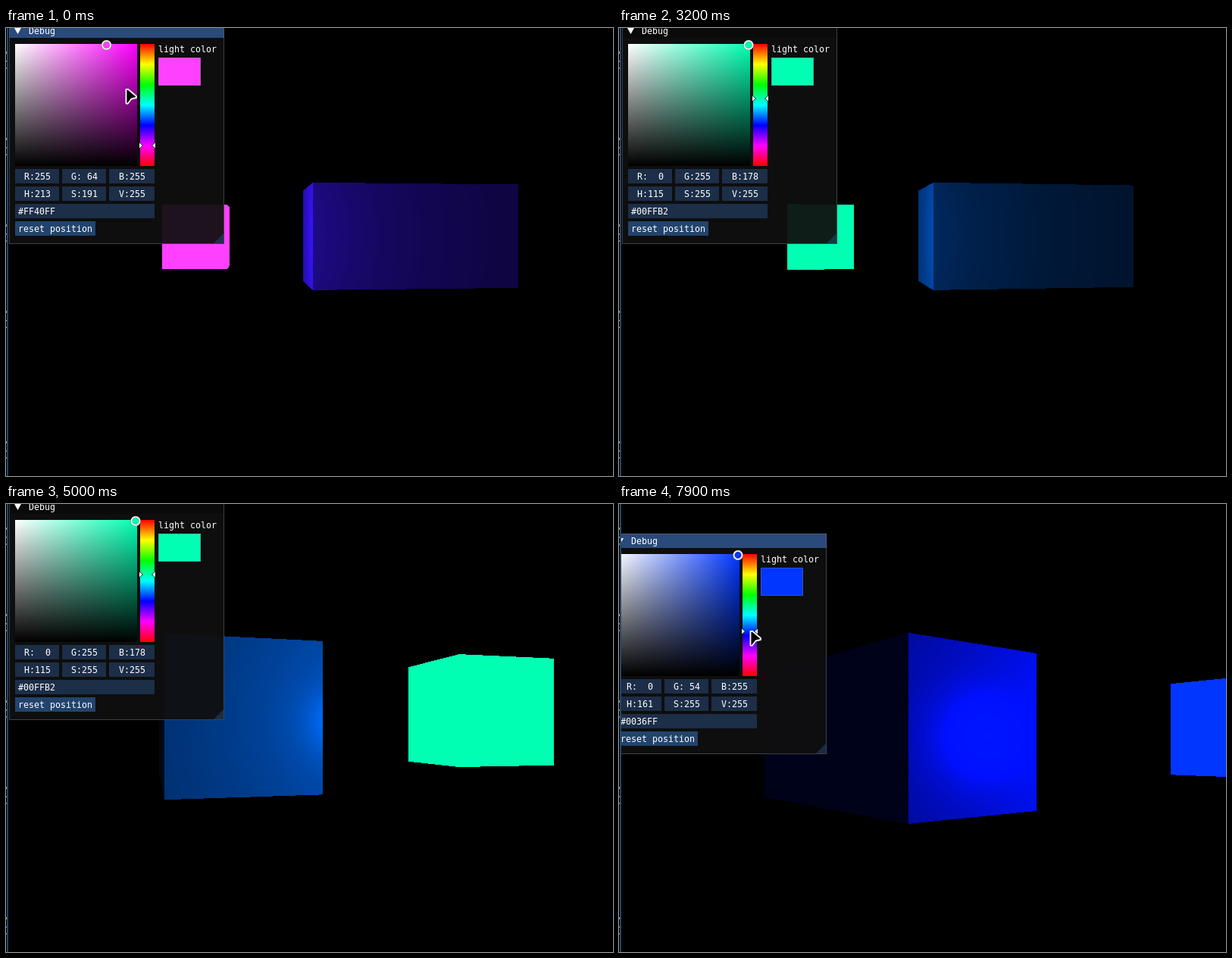
These frames come from a looping animation (801 by 591 pixels, 8000 ms). An HTML page with a canvas:

```html
<!DOCTYPE html>
<html lang="en">
<head>
<meta charset="utf-8">
<title>Light color demo</title>
<style>
html, body { margin: 0; width: 100%; height: 100%; overflow: hidden; background: #000; }
canvas { display: block; }
</style>
</head>
<body>
<canvas id="stage" width="801" height="591"></canvas>
<script>
const W = 801, H = 591, LOOP = 8000, STEP = 100;
const ctx = document.getElementById('stage').getContext('2d');

// Scene in world units: y is up, a lit box two units long and a small glowing cube.
const FOCAL = 720, CENTER_X = 400;
const BOX = { min: [0, -0.5, -1], max: [2, 0.5, 0], color: [0.22, 0.3, 1] };
const LAMP = { min: [-1.255, -0.25, 0.233], max: [-0.755, 0.25, 0.733] };
const LAMP_POS = [-1, 0, 0.48];

// Camera poses: time, x, y, z, yaw, screen height of the horizon.
const FLIGHT = [
  [2800, -0.566, 0.027, 5.038, 0.105, 271],
  [3200, -0.862, 0.027, 4.997, 0.15, 271],
  [3900, -1.9, -0.03, 1.7, 0.7, 273],
  [4400, -3.994, -0.083, -0.072, 1.414, 275.6],
  [5500, -2.887, -0.114, -1.92, 2.22, 324.6],
  [5700, -2.319, -0.114, -2.668, 2.22, 324.6]];

const progress = (t, a, b) => Math.max(0, Math.min(1, (t - a) / (b - a)));
const lerp = (a, b, f) => a + (b - a) * f;
const dot = (a, b) => a[0] * b[0] + a[1] * b[1] + a[2] * b[2];
const unit = v => {
  const n = Math.hypot(v[0], v[1], v[2]);
  return [v[0] / n, v[1] / n, v[2] / n];
};

const hueAt = t => 300 - 165 * progress(t, 900, 1400)
  + 26.88 * progress(t, 1600, 2000) + 65.41 * progress(t, 7400, 7900);
const satAt = t => 0.749 + 0.251 * progress(t, 300, 700);

function panelAt(t) {
  const f = progress(t, 7000, 7300);
  return [Math.round(4 - 14 * f ** 2.4), Math.round(-6 + 45 * f ** 1.47)];
}

function cursorAt(t) {
  const [px, py] = panelAt(t);
  const hueY = py + 26 + 161 * hueAt(t) / 360;
  if (t < 900) {
    const f = progress(t, 0, 900);
    return [158 + 26 * f, lerp(80, 154, f) - 110 * Math.sin(Math.PI * f)];
  }
  if (t < 2600) {
    const f = progress(t, 2000, 2400);
    return [lerp(181, 424, f), lerp(hueY, 300, f)];
  }
  if (t < 5900) return null;
  if (t < 7000) {
    const f = progress(t, 5900, 6700);
    return [lerp(505, 203, f) - 7 * progress(t, 6700, 6900), lerp(347, 113, f)];
  }
  if (t < 7400) return [px + 192, py + 128];
  return [lerp(182, 173, progress(t, 7300, 7900)), hueY];
}

function cameraAt(t) {
  const last = FLIGHT.length - 1;
  let i = 0;
  while (i < last - 1 && t >= FLIGHT[i + 1][0]) i++;
  const a = FLIGHT[i], b = FLIGHT[i + 1], f = progress(t, a[0], b[0]);
  const [x, y, z, yaw, horizon] = a.slice(1).map((v, k) => lerp(v, b[k + 1], f));
  return { eye: [x, y, z], sin: Math.sin(yaw), cos: Math.cos(yaw), horizon };
}

function hsv(h, s, v) {
  const part = n => {
    const k = (n + h / 60) % 6;
    return v - v * s * Math.max(0, Math.min(k, 4 - k, 1));
  };
  return [part(5), part(3), part(1)];
}

const css = c => `rgb(${c.map(v => Math.round(255 * v)).join(',')})`;

// Phong shading: ambient, diffuse and specular.
function brightness(p, axis, side, eye) {
  const toLamp = unit([LAMP_POS[0] - p[0], LAMP_POS[1] - p[1], LAMP_POS[2] - p[2]]);
  const diffuse = side * toLamp[axis];
  const bounce = toLamp.map((v, i) => i === axis ? v : -v);
  const toEye = unit([eye[0] - p[0], eye[1] - p[1], eye[2] - p[2]]);
  const shine = Math.max(0, dot(bounce, toEye)) ** 32;
  return 0.1 + Math.max(0, diffuse) + 0.5 * shine;
}

function screenBounds(solid, cam) {
  const us = [], vs = [];
  for (let i = 0; i < 8; i++) {
    const [dx, dy, dz] = [0, 1, 2].map(k => (i >> k & 1 ? solid.max : solid.min)[k] - cam.eye[k]);
    const depth = Math.max(0.1, dx * cam.sin - dz * cam.cos);
    us.push(CENTER_X + FOCAL * (dx * cam.cos + dz * cam.sin) / depth);
    vs.push(cam.horizon - FOCAL * dy / depth);
  }
  const clip = (v, max) => Math.max(0, Math.min(max, Math.round(v)));
  return [clip(Math.min(...us), W), clip(Math.max(...us), W),
    clip(Math.min(...vs), H), clip(Math.max(...vs), H)];
}

// Casts one ray per pixel against an axis-aligned solid.
function castSolid(image, solid, cam, light) {
  const [u0, u1, v0, v1] = screenBounds(solid, cam);
  const { eye, sin, cos } = cam;
  for (let v = v0; v < v1; v++) {
    for (let u = u0; u < u1; u++) {
      const sx = (u + 0.5 - CENTER_X) / FOCAL;
      const ray = [cos * sx + sin, (cam.horizon - v - 0.5) / FOCAL, sin * sx - cos];
      let near = 0, far = Infinity, axis = 0;
      for (let k = 0; k < 3; k++) {
        const a = (solid.min[k] - eye[k]) / ray[k], b = (solid.max[k] - eye[k]) / ray[k];
        const enter = Math.min(a, b);
        if (enter > near) { near = enter; axis = k; }
        far = Math.min(far, Math.max(a, b));
      }
      if (near >= far) continue;
      const hit = [eye[0] + ray[0] * near, eye[1] + ray[1] * near, eye[2] + ray[2] * near];
      const k = solid.color ? brightness(hit, axis, -Math.sign(ray[axis]), eye) : 1;
      const at = (v * W + u) * 4;
      for (let c = 0; c < 3; c++) {
        image.data[at + c] = 255 * light[c] * k * (solid.color ? solid.color[c] : 1);
      }
      image.data[at + 3] = 255;
    }
  }
}

function drawScene(t, light) {
  const cam = cameraAt(t), image = ctx.createImageData(W, H);
  castSolid(image, BOX, cam, light);
  castSolid(image, LAMP, cam, light);
  ctx.putImageData(image, 0, 0);
  ctx.globalCompositeOperation = 'destination-over';
  rect(0, 0, W, H, '#000');
  ctx.globalCompositeOperation = 'source-over';
}

function rect(x, y, w, h, fill) {
  ctx.fillStyle = fill;
  ctx.fillRect(x, y, w, h);
}

function poly(pts, fill) {
  ctx.beginPath();
  for (let i = 0; i < pts.length; i += 2) ctx.lineTo(pts[i], pts[i + 1]);
  ctx.closePath();
  ctx.fillStyle = fill;
  ctx.fill();
}

function ramp(x0, y0, x1, y1, colors) {
  const g = ctx.createLinearGradient(x0, y0, x1, y1);
  colors.forEach((c, i) => g.addColorStop(i / (colors.length - 1), c));
  return g;
}

function label(s, x, midY) {
  ctx.fillStyle = '#fff';
  ctx.fillText(s, x, midY + 4);
}

function field(s, x, y, w, center) {
  rect(x, y, w, 19, 'rgba(41,74,122,0.54)');
  label(s, center ? Math.round(x + (w - s.length * 7) / 2) : x + 4, y + 10);
}

function outline(x, y, w, h) {
  ctx.lineWidth = 1;
  ctx.strokeStyle = 'rgba(110,110,128,0.5)';
  ctx.strokeRect(x + 0.5, y + 0.5, w - 1, h - 1);
}

function hueArrow(x, y, dir) {
  poly([x - dir, y - 5, x + 5 * dir, y, x - dir, y + 5], '#000');
  poly([x, y - 3.5, x + 4 * dir, y, x, y + 3.5], '#fff');
}

function drawPicker(h, s, light) {
  const size = 161, x = 8, y = 27;
  rect(x, y, size, size, ramp(x, 0, x + size, 0, ['#fff', css(hsv(h, 1, 1))]));
  rect(x, y, size, size, ramp(0, y, 0, y + size, ['rgba(0,0,0,0)', '#000']));
  const wheel = [0, 1, 2, 3, 4, 5, 6].map(i => css(hsv(i * 60, 1, 1)));
  rect(173, y, 19, size, ramp(0, y, 0, y + size, wheel));

  const hueY = Math.round(y + size * h / 360);
  hueArrow(172, hueY, 1);
  hueArrow(193, hueY, -1);

  ctx.beginPath();
  ctx.arc(Math.min(x + size * s, x + size - 2), y + 1.5, 5.5, 0, 7);
  ctx.fillStyle = css(light);
  ctx.fill();
  ctx.lineWidth = 2.6;
  ctx.strokeStyle = '#808080';
  ctx.stroke();
  ctx.lineWidth = 1.5;
  ctx.strokeStyle = '#fff';
  ctx.stroke();
}

function drawPanel(t, h, s, light) {
  const focused = t < 2600 || t >= 6900;
  ctx.save();
  ctx.beginPath();
  ctx.rect(3, 0, W, H);
  ctx.clip();
  ctx.translate(...panelAt(t));
  ctx.font = '11.63px "DejaVu Sans Mono", monospace';

  rect(0, 0, 284, 291, 'rgba(15,15,15,0.94)');
  rect(0, 0, 284, 19, focused ? '#294a7a' : '#0a0a0a');
  outline(0, 0, 284, 291);
  poly([7, 6, 16, 6, 11.5, 14], '#fff');
  label('Debug', 26, 10);
  poly([283, 277, 283, 290, 270, 290], 'rgba(66,150,250,0.22)');

  drawPicker(h, s, light);
  label('light color', 197, 34);
  rect(197, 45, 56, 37, css(light));
  outline(197, 45, 56, 37);

  const rgbBytes = light.map(v => Math.round(v * 255));
  const hsvBytes = [h / 360, s, 1].map(v => Math.round(v * 255 + 0.01));
  for (let i = 0; i < 3; i++) {
    const x = 8 + 62 * i, w = i < 2 ? 58 : 60;
    field('RGB'[i] + ':' + String(rgbBytes[i]).padStart(3), x, 192, w, true);
    field('HSV'[i] + ':' + String(hsvBytes[i]).padStart(3), x, 215, w, true);
  }
  const hex = rgbBytes.map(v => v.toString(16).padStart(2, '0')).join('').toUpperCase();
  field('#' + hex, 8, 238, 184, false);
  rect(8, 261, 106, 19, 'rgba(66,150,250,0.4)');
  label('reset position', 12, 271);
  ctx.restore();
}

function drawCursor(t) {
  const spot = cursorAt(t);
  if (!spot) return;
  ctx.save();
  ctx.translate(Math.round(spot[0]), Math.round(spot[1]));
  ctx.lineJoin = 'round';
  ctx.lineWidth = 1.8;
  ctx.strokeStyle = '#fff';
  poly([0.5, 1, 3, 0.8, 14, 10, 14, 12, 7.5, 13.5, 2.5, 20, 0.5, 19.5], '#000');
  ctx.stroke();
  ctx.restore();
}

// Sliver of the window behind, along the left side.
function drawEdge() {
  rect(0, 0, 3, H, '#000');
  rect(1, 0, 2, H, '#22486c');
  for (const y of [32, 146, 260, 374, 546]) {
    rect(0, y - 1, 1, 3, '#a9b04a');
    rect(0, y + 11, 1, 2, '#889');
    rect(0, y + 20, 1, 2, '#889');
  }
}

function draw(t) {
  const h = hueAt(t), s = satAt(t), light = hsv(h, s, 1);
  drawScene(t, light);
  drawPanel(t, h, s, light);
  drawEdge();
  drawCursor(t);
}

const start = performance.now();
let shown = -1;
function tick() {
  const t = Math.floor((performance.now() - start) % LOOP / STEP) * STEP;
  if (t !== shown) draw(shown = t);
  requestAnimationFrame(tick);
}
tick();
</script>
</body>
</html>
```
